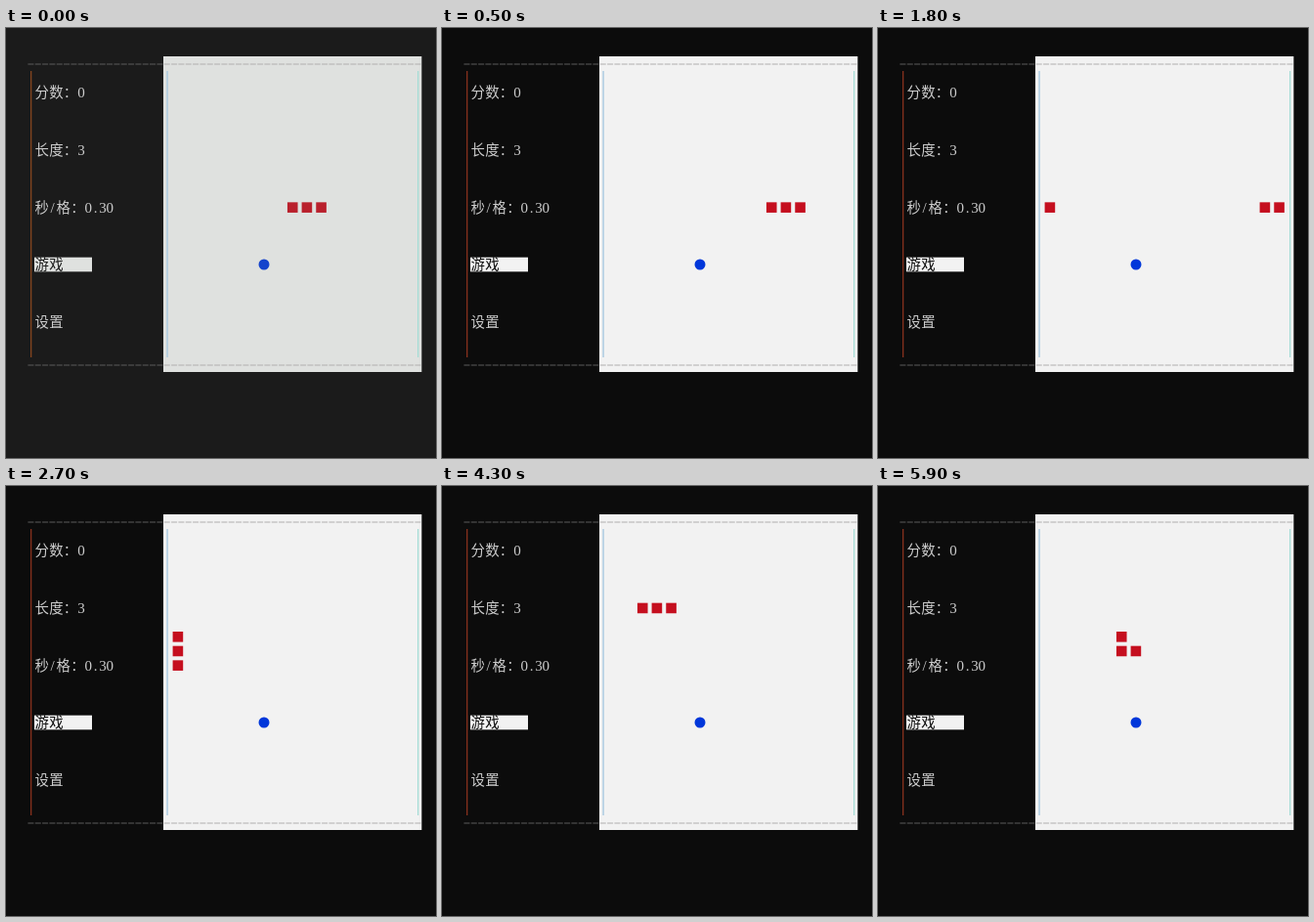
Animation, 440 px wide and 440 px high, one loop 6 s. Source, as an HTML page with a canvas:

```html
<!DOCTYPE html>
<html lang="zh-CN">
<head>
<meta charset="utf-8">
<style>
html, body { margin: 0; width: 100%; height: 100%; overflow: hidden; background: #0c0c0c; }
canvas { display: block; }
</style>
</head>
<body>
<canvas id="stage" width="440" height="440"></canvas>
<script>
const ctx = document.getElementById('stage').getContext('2d');
const LOOP = 6000;
const ROW = 44 / 3;
const HALF = ROW / 2;
const LEFT = 22;
const BOARD = LEFT + 19 * HALF;
const RIGHT = LEFT + 55 * HALF;
const COLS = 17;

const dim = { bg: '#1b1b1b', board: '#dfe1df', snake: '#b9202c', food: '#1443cc', edge: '#85451f' };
const full = { bg: '#0c0c0c', board: '#f2f2f2', snake: '#c50f1f', food: '#0037da', edge: '#86301c' };

// The first seven steps come unevenly; from 1500 ms on they follow a 300 ms beat.
const moves = [100, 200, 500, 600, 1100, 1500, 1800, 2100, 2400,
  2800, 3100, 3400, 3700, 4000, 4300, 4600, 4900, 5300, 5600, 5900];

// Snake route as [column step, row step, count].
const turns = [[1, 0, 9], [0, -1, 4], [1, 0, 5], [0, 1, 3], [1, 0, 1]];
const path = [[8, 12]];
for (const [dx, dy, count] of turns) {
  for (let i = 0; i < count; i++) {
    const [x, y] = path[path.length - 1];
    path.push([(x + dx) % COLS, y + dy]);
  }
}

const labels = [[4, '分数:0'], [8, '长度:3'], [12, '秒/格:0.30'], [16, '游戏'], [20, '设置']];

const colX = col => BOARD + ROW * (col + 1);
const rowY = row => ROW * (row + 0.5);

function rect(color, x, y, w, h) {
  ctx.fillStyle = color;
  ctx.fillRect(x, y, w, h);
}

function text(str, row, color) {
  let x = LEFT + HALF;
  ctx.fillStyle = color;
  ctx.textBaseline = 'alphabetic';
  ctx.textAlign = 'center';
  for (const ch of str) {
    const wide = ch === ':' || ch > '\u2fff';
    const w = wide ? ROW : HALF;
    ctx.font = wide
      ? '300 14.4px "Noto Sans CJK SC", "Noto Sans CJK", sans-serif'
      : '15px "Liberation Serif", serif';
    ctx.fillText(ch === ':' ? '\uff1a' : ch, x + w / 2, rowY(row) + 5.2);
    x += w;
  }
}

function dashes(y) {
  for (let i = 0; i < 55; i++) {
    rect(i < 19 ? '#5c5c5c' : '#b2b0b0', LEFT + i * HALF + 0.4, y, HALF - 1.3, 1);
  }
}

function draw(t) {
  const c = t < 500 ? dim : full;
  rect(c.bg, 0, 0, 440, 440);
  rect(c.board, 161, 29, RIGHT - 161, 323);

  dashes(36.5);
  dashes(344.5);
  rect(c.edge, 25, 44, 1.3, 293);
  rect('#a3c6df', 164.4, 44, 1.3, 293);
  rect('#a5ddd6', 421, 44, 1.3, 293);

  rect(c.board, 29, 234.67, 59, ROW);
  for (const [row, str] of labels) text(str, row, row === 16 ? c.bg : '#cccccc');

  ctx.fillStyle = c.food;
  ctx.beginPath();
  ctx.arc(colX(6), rowY(16), 5.5, 0, Math.PI * 2);
  ctx.fill();

  const step = moves.filter(m => m <= t).length;
  for (const [col, row] of path.slice(step, step + 3)) {
    rect(c.snake, colX(col) - 5.4, rowY(row) - 5, 10.6, 10.6);
  }
}

const start = performance.now();
function tick() {
  draw((performance.now() - start) % LOOP);
  requestAnimationFrame(tick);
}
tick();
</script>
</body>
</html>
```
